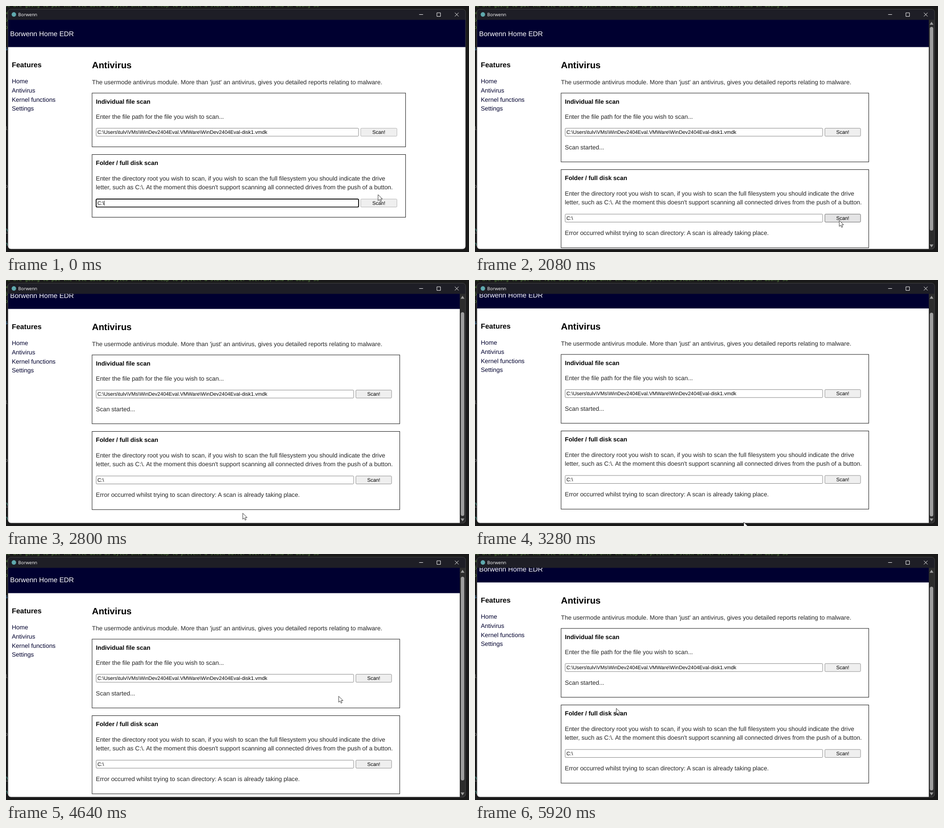
An HTML page that plays this animation: 952x506 px, repeating every 6 s.

```html
<!DOCTYPE html>
<html lang="en">
<head>
<meta charset="utf-8">
<title>Borwenn</title>
<style>
  html, body { margin: 0; width: 100%; height: 100%; overflow: hidden; background: #1a1a1a; }
  svg { display: block; }
  text {
    font-family: "Liberation Sans", Arial, sans-serif;
    text-rendering: geometricPrecision;
    white-space: pre;
  }
  .code { font: 10.05px "DejaVu Sans Mono", monospace; }
  .caption { font: 9.3px "Open Sans", "Noto Sans", sans-serif; }
</style>
</head>
<body>
<svg id="stage" width="952" height="506" viewBox="0 0 952 506">
  <defs>
    <clipPath id="frame"><rect x="4" y="7" width="941" height="493" rx="6"/></clipPath>
    <clipPath id="view"><rect x="4" y="28" width="941" height="472"/></clipPath>
  </defs>
  <g id="backdrop"></g>
  <g clip-path="url(#frame)">
    <rect x="4" y="28" width="941" height="472" fill="#fff"/>
    <g id="page" clip-path="url(#view)"></g>
    <g id="titlebar"></g>
  </g>
  <rect x="4" y="6.5" width="941" height="493.5" rx="6" fill="none" stroke="#4a4a4c" stroke-width=".8"/>
  <g id="pointer"></g>
</svg>
<script>
const LOOP = 6000, STEP = 80;
const BODY = 12.54, SMALL = 10.47;
const $ = id => document.getElementById(id);

// Keyframes: [time, ...values], linear in between.
const POINTER = [
  [240, 765, 388], [400, 776, 368], [560, 800, 318], [720, 798, 278], [880, 786, 258],
  [1040, 786, 258], [1200, 789, 290], [1520, 768, 395], [1840, 763, 437], [2000, 763, 437],
  [2160, 735, 445], [2400, 585, 460], [2640, 460.5, 475], [2880, 500, 482], [3280, 552.5, 498],
  [3760, 552.5, 498], [3840, 551.5, 493], [3920, 551.5, 493], [4240, 645, 365], [4480, 684, 253],
  [4560, 685, 270], [4720, 683, 315], [4880, 682, 344], [5120, 682, 344], [5200, 680.5, 350],
  [5440, 520, 350], [5600, 350, 300], [5760, 249.5, 281.5], [5840, 272, 299], [5920, 290.5, 317.5]
];
const SCROLL = [
  [2560, 0], [2640, 6], [2720, 19], [2800, 25], [2880, 26], [4480, 26],
  [4560, 12], [4640, 4], [4720, 1], [4800, 0], [5200, 0], [5280, 6], [5360, 19], [5440, 25], [5520, 26]
];

function sample(keys, t) {
  const next = keys.findIndex(key => key[0] > t);
  if (next === 0) return keys[0].slice(1);
  if (next < 0) return keys.at(-1).slice(1);
  const a = keys[next - 1], b = keys[next], p = (t - a[0]) / (b[0] - a[0]);
  return a.slice(1).map((v, i) => v + (b[i + 1] - v) * p);
}

const text = (x, y, str, size = BODY, fill = "#252525", extra = "") =>
  `<text x="${x}" y="${y}" font-size="${size}" fill="${fill}" ${extra}>${str}</text>`;
const bold = (x, y, str, size = BODY) => text(x, y, str, size, "#000", 'font-weight="700"');
const rect = (x, y, w, h, fill, extra = "") =>
  `<rect x="${x}" y="${y}" width="${w}" height="${h}" fill="${fill}" ${extra}/>`;
const path = (d, extra) => `<path d="${d}" ${extra}/>`;
const code = (x, y, str, fill) => text(x, y, str, 10.05, fill, 'class="code"');

function card(y, height, wide) {
  return rect(177, y + .5, wide ? 644.6 : 632.6, height, "#fff", 'stroke="#222"');
}

function field(y, value, wide, focused) {
  const width = wide ? 539.5 : 529.5;
  const border = focused ? 'stroke="#000" stroke-width="1.7" rx="2"' : 'stroke="#808080" stroke-width=".9" rx="1.6"';
  return rect(185.4, y + .4, width, 16.4, "#fff", border)
    + text(188, y + 12.3, value, SMALL, "#000")
    + (focused ? rect(201.6, y + 3.4, .9, 10.4, "#000") : "");
}

function button(y, wide, hovered) {
  const x = wide ? 729.4 : 719.4, width = wide ? 74.4 : 73.4;
  const stroke = hovered ? "#666" : wide ? "#b0b0b0" : "#8c8c8c";
  return rect(x, y + .4, width, 16.4, hovered ? "#e4e4e5" : "#efefef", `stroke="${stroke}" stroke-width=".9" rx="1.6"`)
    + text(x + width / 2, y + 12.3, "Scan!", SMALL, "#000", 'text-anchor="middle"');
}

function page(t, scroll, [px, py]) {
  const wide = t < 2080, started = t >= 960, failed = !wide;
  const shift = started ? 31 : 0;
  const over = y => px > 729 - !wide * 10 && px < (wide ? 804 : 793) && py + scroll > y && py + scroll < y + 17;
  const nav = ["Home", "Antivirus", "Kernel functions", "Settings"]
    .map((name, i) => text(12, 159 + i * 18.8, name, BODY, "#00002e")).join("");

  return `<g transform="translate(0 ${-scroll})">`
    + rect(4, 0, 941, 84.5, "#000030")
    + text(8.5, 61.8, "Borwenn Home EDR", 14.11, "#fff")
    + bold(12, 126, "Features", 14.68) + nav
    + bold(176.8, 128.4, "Antivirus", 18.82)
    + text(176.8, 161, "The usermode antivirus module. More than 'just' an antivirus, gives you detailed reports relating to malware.")
    + card(178.6, started ? 141.6 : 110.6, wide)
    + bold(184.8, 201, "Individual file scan")
    + text(184.8, 232.3, "Enter the file path for the file you wish to scan...")
    + field(251, "C:\\Users\\tulv\\VMs\\WinDev2404Eval.VMWare\\WinDev2404Eval-disk1.vmdk", wide)
    + button(251, wide, over(251))
    + (started ? text(184.8, 295, "Scan started...") : "")
    + `<g transform="translate(0 ${shift})">`
    + card(305, failed ? 160.8 : 129, wide)
    + bold(184.8, 327.3, "Folder / full disk scan")
    + text(184.8, 358.6, "Enter the directory root you wish to scan, if you wish to scan the full filesystem you should indicate the drive")
    + text(184.8, 377.4, "letter, such as C:\\. At the moment this doesn't support scanning all connected drives from the push of a button.")
    + field(396.7, "C:\\", wide, t < 880)
    + button(396.7, wide, over(396.7 + shift))
    + (failed ? text(184.8, 440.4, "Error occurred whilst trying to scan directory: A scan is already taking place.") : "")
    + "</g></g>"
    + (wide ? "" : scrollbar(scroll));
}

function scrollbar(scroll) {
  return rect(933, 28, 12, 472, "#2c2c2c")
    + rect(935.2, 43 + scroll * .93, 7, 419, "#9f9f9f", 'rx="3.5"')
    + path("M934.8 38.6L938.7 32.6L942.6 38.6ZM934.8 490.6L938.7 496.6L942.6 490.6Z", 'fill="#9f9f9f"');
}

function pointer(t, [x, y]) {
  const overText = (t >= 2320 && t <= 2480) || (t >= 4240 && t <= 4480);
  const shape = overText
    ? path("M-3.5 -6.5H-1L0 -5.8L1 -6.5H3.5M0 -5.8V5.8M-3.5 6.5H-1L0 5.8L1 6.5H3.5",
        'fill="none" stroke="#222" stroke-width="1.2"')
    : path("M0 0V12.4L2.9 9.8L4.9 14.3L7 13.4L5.1 9H9Z",
        'fill="#fff" stroke="#111" stroke-width=".8" stroke-linejoin="round"');
  return `<g transform="translate(${x} ${y})">${shape}</g>`;
}

$("backdrop").innerHTML = rect(0, 0, 952, 506, "#1a1a1a")
  + code(-3.4, 2.2, "we are going to put the file data as bytes onto the heap to prevent a stack buffer overrun, and in doing so", "#55803f")
  + [["w", 17, "#55803f"], ["5", 32, "#55803f"], ["o", 47, "#55803f"], ["s", 91, "#4c8fc4"],
     ["l", 255, "#777"], ["p", 374, "#777"], ["h", 464, "#55b5a5"], ["h", 493, "#55b5a5"]]
    .map(([glyph, y, fill]) => code(-2.2, y, glyph, fill)).join("")
  + rect(0, 466.5, 4, 1, "#777");

$("titlebar").innerHTML = rect(4, 6, 941, 22.5, "#1e1e26")
  + '<circle cx="16.2" cy="17.4" r="4.6" fill="#5fa9ae"/>'
  + text(25, 20.9, "Borwenn", 9.3, "#fff", 'class="caption"')
  + path("M849.5 17.5H857.5M886 14H893.4V21.4H886ZM923 13.8L930.6 21.4M930.6 13.8L923 21.4",
      'fill="none" stroke="#eee" stroke-width="1"');

let shown = -1;
function draw(now) {
  const t = Math.floor(now % LOOP / STEP) * STEP;
  if (t !== shown) {
    shown = t;
    const position = sample(POINTER, t), [scroll] = sample(SCROLL, t);
    $("page").innerHTML = page(t, scroll, position);
    $("pointer").innerHTML = pointer(t, position);
  }
  requestAnimationFrame(draw);
}
draw(performance.now());
</script>
</body>
</html>
```
